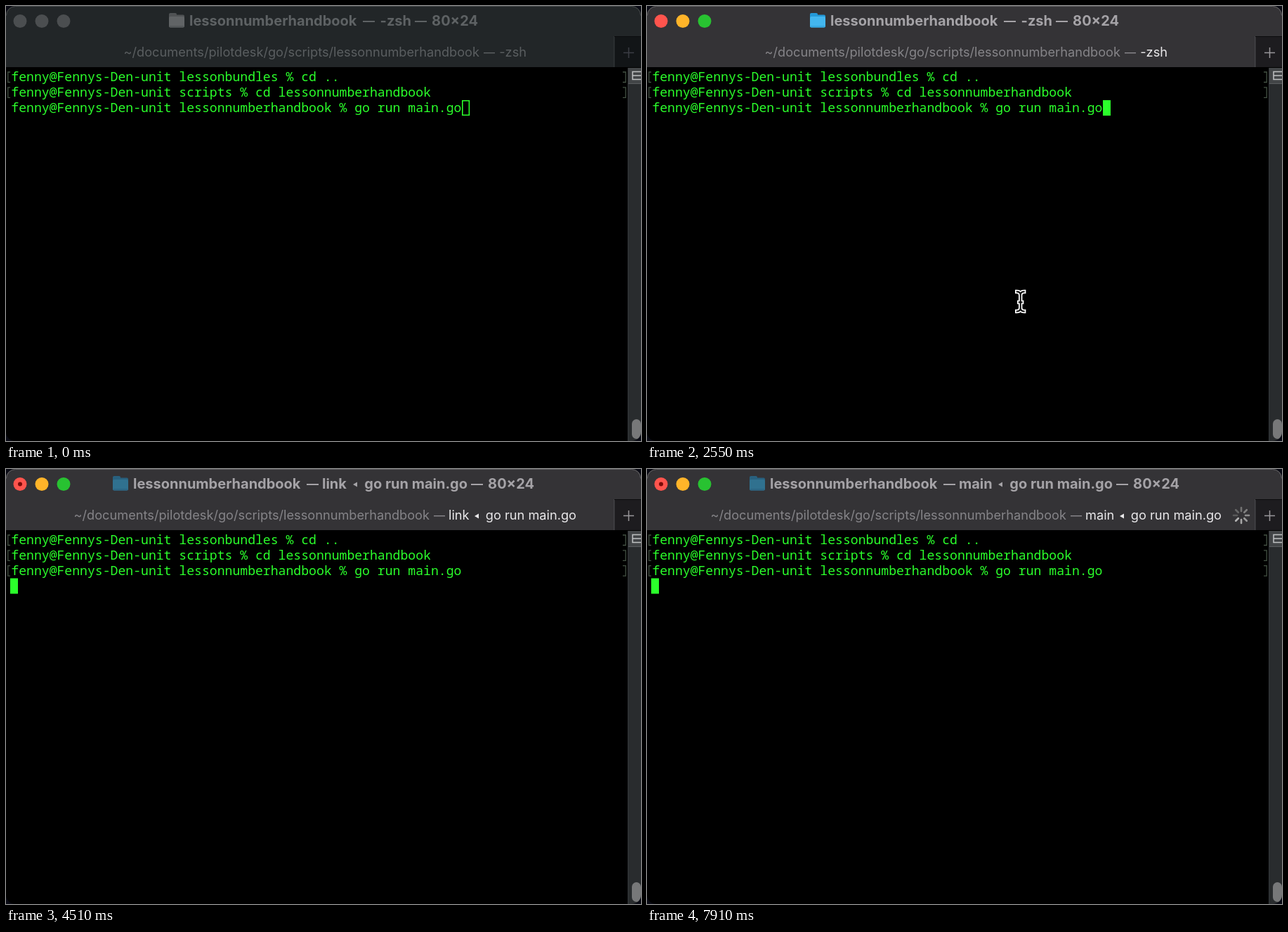
Recreate the animation shown at these times as an HTML page with a canvas. Size 904 px wide and 619 px high, loop 8 s.

```html
<!DOCTYPE html>
<html lang="en">
<head>
<meta charset="utf-8">
<title>Terminal</title>
<style>
  html, body { margin: 0; width: 100%; height: 100%; overflow: hidden; background: #000; }
  canvas { display: block; }
</style>
</head>
<body>
<canvas id="stage" width="904" height="619"></canvas>
<script>
const ctx = document.getElementById('stage').getContext('2d');
const LOOP = 8000, FOCUS = 1250, ENTER = 3050, BLINK = 600;
const ROW = 21.8, GREEN = '#2bff2b';
const FOLDER_NAME = 'lessonnumberhandbook';
const PATH = '~/documents/pilotdesk/go/scripts/' + FOLDER_NAME;
const HOST = 'fenny@Fennys-Den-unit ';
const LINES = [
  HOST + 'lessonbundles % cd ..',
  HOST + 'scripts % cd ' + FOLDER_NAME,
  HOST + FOLDER_NAME + ' % go run main.go'
];
const TITLE_FONT = '700 20px Inter, sans-serif';
const TAB_FONT = '400 18.2px Inter, sans-serif';
const MONO_FONT = '500 18.13px "Noto Sans Mono", monospace';

// Left edges of the centred title and tab label for each foreground process.
const PROCESSES = [
  { start: 0, parent: '', command: '-zsh', title: 232, tab: 166 },
  { start: 3800, parent: '', command: 'go run main.go', title: 181, tab: 120 },
  { start: 4350, parent: 'link', command: 'go run main.go', title: 152, tab: 95 },
  { start: 5400, parent: 'main', command: 'go run main.go', title: 146, tab: 89, spinner: true }
];

function rect(x, y, w, h, color) {
  ctx.fillStyle = color;
  ctx.fillRect(x, y, w, h);
}

function rounded(x, y, w, h, r, color) {
  ctx.fillStyle = color;
  ctx.beginPath();
  ctx.roundRect(x, y, w, h, r);
  ctx.fill();
}

function circle(x, y, r, color) {
  ctx.fillStyle = color;
  ctx.beginPath();
  ctx.arc(x, y, r, 0, 2 * Math.PI);
  ctx.fill();
}

function text(str, x, y, font, color, align = 'left') {
  ctx.font = font;
  ctx.fillStyle = color;
  ctx.textAlign = align;
  ctx.fillText(str, x, y);
}

function stroke(path, color, width) {
  ctx.strokeStyle = color;
  ctx.lineWidth = width;
  ctx.stroke(new Path2D(path));
}

function triangle(x, y, color) {
  ctx.fillStyle = color;
  ctx.fill(new Path2D(`M${x} ${y}l6 -3.5v7z`));
}

function folder(x, active, busy) {
  const [back, front, edge] = !active ? ['#505355', '#616466', '#4b4e50']
    : busy ? ['#28617f', '#30718f', '#285f7c']
    : ['#2499d8', '#43b6ee', '#2b9bd6'];
  rounded(x, 10, 11, 8, 2, back);
  rounded(x, 12.5, 22, 18, 2, back);
  rounded(x, 15, 22, 15.5, 2, front);
  rect(x + 1, 28.5, 20, 1, edge);
}

function drawTitle(p, active) {
  const color = active ? '#a5a3a7' : '#5e6264';
  const right = 904 - p.title;
  folder(p.title, active, p.start > 0);
  const put = (str, x, align) => text(str, x, 28, TITLE_FONT, color, align);
  put(FOLDER_NAME, p.title + 29, 'left');
  rect(p.title + 276, 21, 17, 2, color);
  put(p.command, right - 95, 'right');
  rect(right - 90, 21, 17, 2, color);
  put('80×24', right, 'right');
  if (p.parent) {
    put(p.parent, p.title + 298, 'left');
    triangle(right - 258, 22, color);
  }
}

function drawTab(p, active) {
  const dim = active ? '#858488' : '#5a5e60';
  const bright = active ? '#e9e8ea' : dim;
  const right = 907 - p.tab;
  const put = (str, x, color, align) => text(str, x, 72, TAB_FONT, color, align);
  put(PATH, p.tab + 508, dim, 'right');
  rect(p.tab + 514, 66, 16, 1.5, dim);
  put(p.command, right, bright, 'right');
  if (p.parent) {
    put(p.parent, p.tab + 535, bright, 'left');
    triangle(right - 145, 67, bright);
  }
}

function drawSpinner(t) {
  const head = Math.floor(t / 100) % 8;
  ctx.lineCap = 'round';
  ctx.lineWidth = 2.6;
  for (let i = 0; i < 8; i++) {
    const angle = Math.PI + i * Math.PI / 4;
    const age = (head - i + 8) % 8;
    const shade = 180 - age * 13;
    const c = Math.cos(angle), s = Math.sin(angle);
    ctx.strokeStyle = `rgb(${shade},${shade},${shade})`;
    ctx.beginPath();
    ctx.moveTo(846 + 6 * c, 66 + 6 * s);
    ctx.lineTo(846 + 11 * c, 66 + 11 * s);
    ctx.stroke();
  }
  ctx.lineCap = 'butt';
}

function drawHeader(t, p, active) {
  rect(0, 0, 904, 87, active ? '#343336' : '#222628');
  rect(866, 43, 38, 44, active ? '#1d1c1f' : '#121517');
  rect(865, 43, 1.5, 44, active ? '#454448' : '#303436');
  rect(866, 43, 38, 1, '#0b0b0d');
  const lights = active ? ['#ff544d', '#ffb429', '#28c231'] : Array(3).fill('#4b4e50');
  lights.forEach((color, i) => circle(20 + i * 31, 21.5, 9.5, color));
  if (p.start > 0) circle(20, 21.5, 3, '#7a0b08');
  drawTitle(p, active);
  drawTab(p, active);
  stroke('M879 66.5h15M886.5 59v15', active ? '#99979b' : '#3b3d45', 1.5);
  if (p.spinner) drawSpinner(t);
}

function drawScrollbar() {
  rect(886, 88, 18, 531, '#292c2e');
  rect(885, 88, 1, 531, '#34373a');
  rect(886, 88, 18, 22, '#424547');
  rect(886, 110, 18, 1, '#595c5e');
  stroke('M904 93.5H892V104.5H904M892 99H904', '#c0c2c3', 1.5);
  rounded(891, 588, 13, 28, 6.5, '#777879');
}

function drawShell(t, active) {
  const entered = t >= ENTER;
  LINES.forEach((line, i) => {
    const y = 107 + i * ROW;
    text(line, 7.3, y, MONO_FONT, GREEN);
    if (i < 2 || entered) {
      const top = y - 13;
      stroke(`M6 ${top}H2.8v14.5H6M878 ${top}h4.2v14.5h-4.2`, '#435143', 1.3);
    }
  });
  const x = entered ? 6 : 649, y = entered ? 155.5 : 134;
  if (!active) {
    stroke(`M${x + .8} ${y + .8}h9.6v20.4h-9.6z`, GREEN, 1.6);
  } else if (Math.floor((t - (entered ? ENTER : FOCUS)) / BLINK) % 2 === 0) {
    rect(x, y, 11, 22, GREEN);
  }
}

function drawPointer(t) {
  if (t < 550 || t >= ENTER) return;
  const away = (1 - Math.min(1, (t - 550) / 300)) ** 3;
  ctx.save();
  ctx.translate(531.7 + 30 * away, 420.5 + 220 * away);
  const beam = 'M-5 -14C-2 -14 0 -12.5 0 -9V9C0 12.5 -2 14 -5 14'
    + 'M5 -14C2 -14 0 -12.5 0 -9M5 14C2 14 0 12.5 0 9M-2 1H2';
  ctx.lineCap = 'square';
  stroke(beam, '#fff', 5.4);
  stroke(beam, '#000', 1.9);
  ctx.restore();
}

function draw(t) {
  const active = t >= FOCUS;
  const process = PROCESSES.findLast(p => t >= p.start);
  rect(0, 0, 904, 619, '#090a14');
  ctx.save();
  ctx.beginPath();
  ctx.roundRect(0, 0, 904, 619, 13);
  ctx.clip();
  rect(0, 0, 904, 619, '#000');
  drawHeader(t, process, active);
  drawScrollbar();
  drawShell(t, active);
  drawPointer(t);
  ctx.restore();

  // Highlight along the top edge and its rounded corners.
  stroke('M.5 13.5A13 13 0 0 1 13.5 .5H890.5A13 13 0 0 1 903.5 13.5',
    active ? '#626164' : '#46494b', 1);
}

const began = performance.now();
function tick() {
  draw((performance.now() - began) % LOOP);
  requestAnimationFrame(tick);
}
tick();
</script>
</body>
</html>
```
